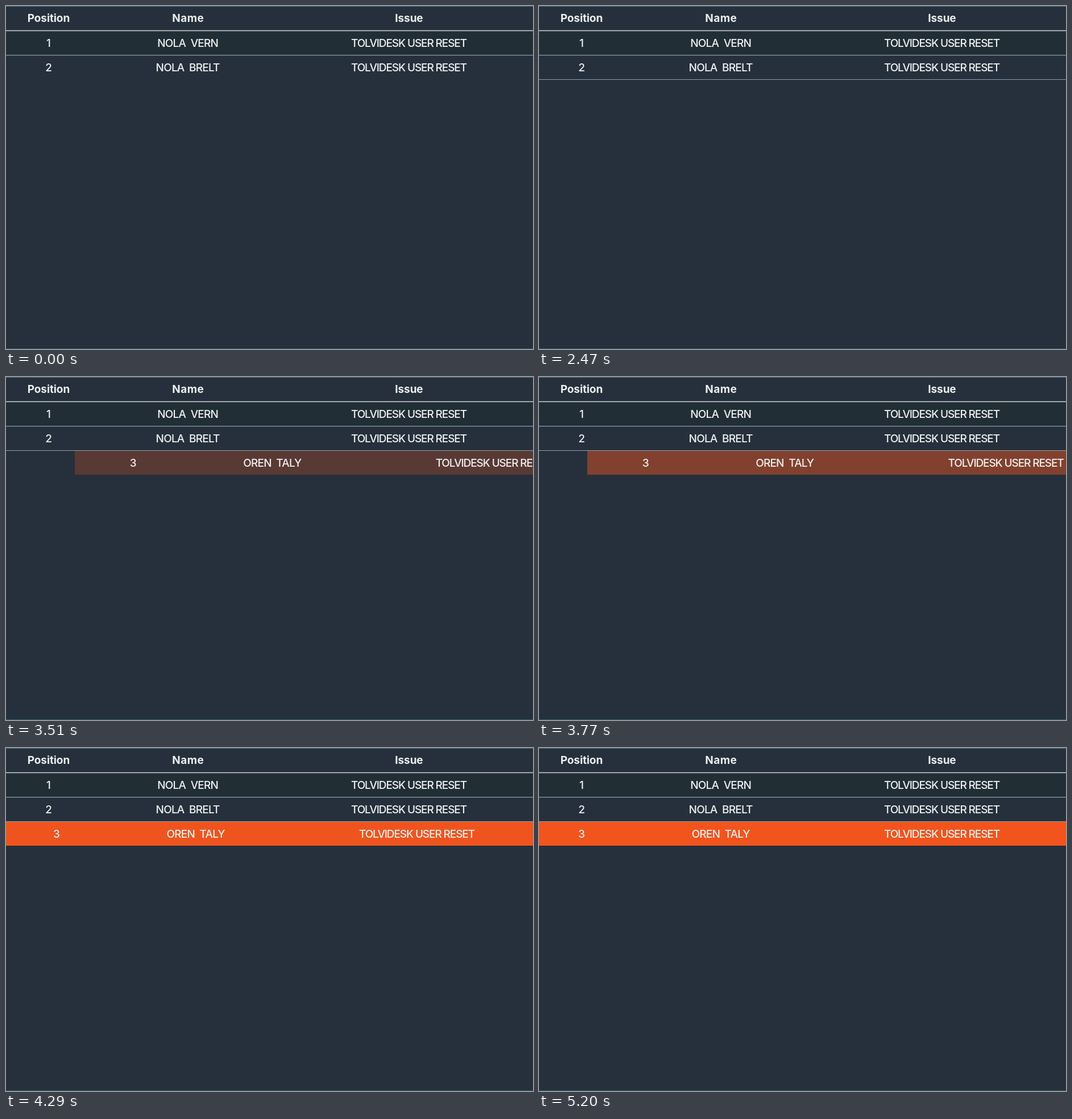
These frames come from a looping animation (927x604 px, 5.33 s). An HTML page with a canvas:

```html
<!DOCTYPE html>
<html lang="en">
<head>
<meta charset="utf-8">
<title>Queue table</title>
<style>
  html, body { margin: 0; width: 100%; height: 100%; overflow: hidden; background: #26303c; }
  canvas { display: block; }
</style>
</head>
<body>
<canvas id="stage" width="927" height="604"></canvas>
<script>
const ctx = document.getElementById('stage').getContext('2d');
const W = 927, H = 604, LOOP = 5330, STEP = 130;
const COLUMNS = [75, 320, 709];
const ISSUE = 'TOLVIDESK USER RESET';
const SLIDE = { start: 2822, length: 1530, distance: 195, overhang: 27.5 };

const mix = (a, b, k) => `rgb(${a.map((v, i) => Math.round(v + (b[i] - v) * k))})`;
const clamp = v => Math.max(0, Math.min(1, v));

function rect(x, y, w, h, color, alpha = 1) {
  ctx.globalAlpha = alpha;
  ctx.fillStyle = color;
  ctx.fillRect(x, y, w, h);
  ctx.globalAlpha = 1;
}

function cells(texts, baseline, font, spacing, dx = 0) {
  ctx.font = font + ' 19px Inter, "Open Sans", sans-serif';
  ctx.textAlign = 'center';
  ctx.fillStyle = '#eef0f0';
  texts.forEach((text, i) => {
    ctx.letterSpacing = spacing[i] + 'px';
    ctx.fillText(text, COLUMNS[i] + dx + spacing[i] / 2, baseline);
  });
}

const header = () => cells(['Position', 'Name', 'Issue'], 28, '700', [-0.1, 0.5, -0.1]);
const row = (n, name, dx) => cells([String(n), name, ISSUE], 29 + 43 * n, '500', [0, -0.8, -1.1], dx);

function newRow(t) {
  // The last stretch of the slide holds briefly before it lands.
  const time = t >= 4550 ? t : Math.min(t, 4290);
  const p = clamp((time - SLIDE.start) / SLIDE.length) ** 1.8;
  const dx = SLIDE.distance * (1 - p);
  const cooling = clamp((t - 4550) / 650);
  const left = Math.round(dx - SLIDE.overhang);
  rect(left, 130, W + SLIDE.overhang, 42, mix([255, 88, 29], [242, 84, 29], cooling), p);
  row(3, 'OREN  TALY', dx);
}

function draw(t) {
  rect(0, 0, W, H, '#26303c');
  rect(0, 44, W, 42, '#222e36');
  rect(0, 0, W, 1, '#557786');
  rect(0, H - 1, W, 1, '#2f6073');

  header();
  row(1, 'NOLA  VERN');
  row(2, 'NOLA  BRELT');
  if (t >= 2990) newRow(t);

  rect(0, 42.7, W, 1.5, '#cbd2d4');
  rect(0, 86, W, 1.2, '#8ba3ad');
  if (t >= 1820) rect(0, 129, W, 1, '#8ba3ad', t < 1950 ? 0.5 : 1);
}

const begin = performance.now();
function tick() {
  const t = (performance.now() - begin) % LOOP;
  draw(Math.floor(t / STEP) * STEP);
  requestAnimationFrame(tick);
}
tick();
</script>
</body>
</html>
```
